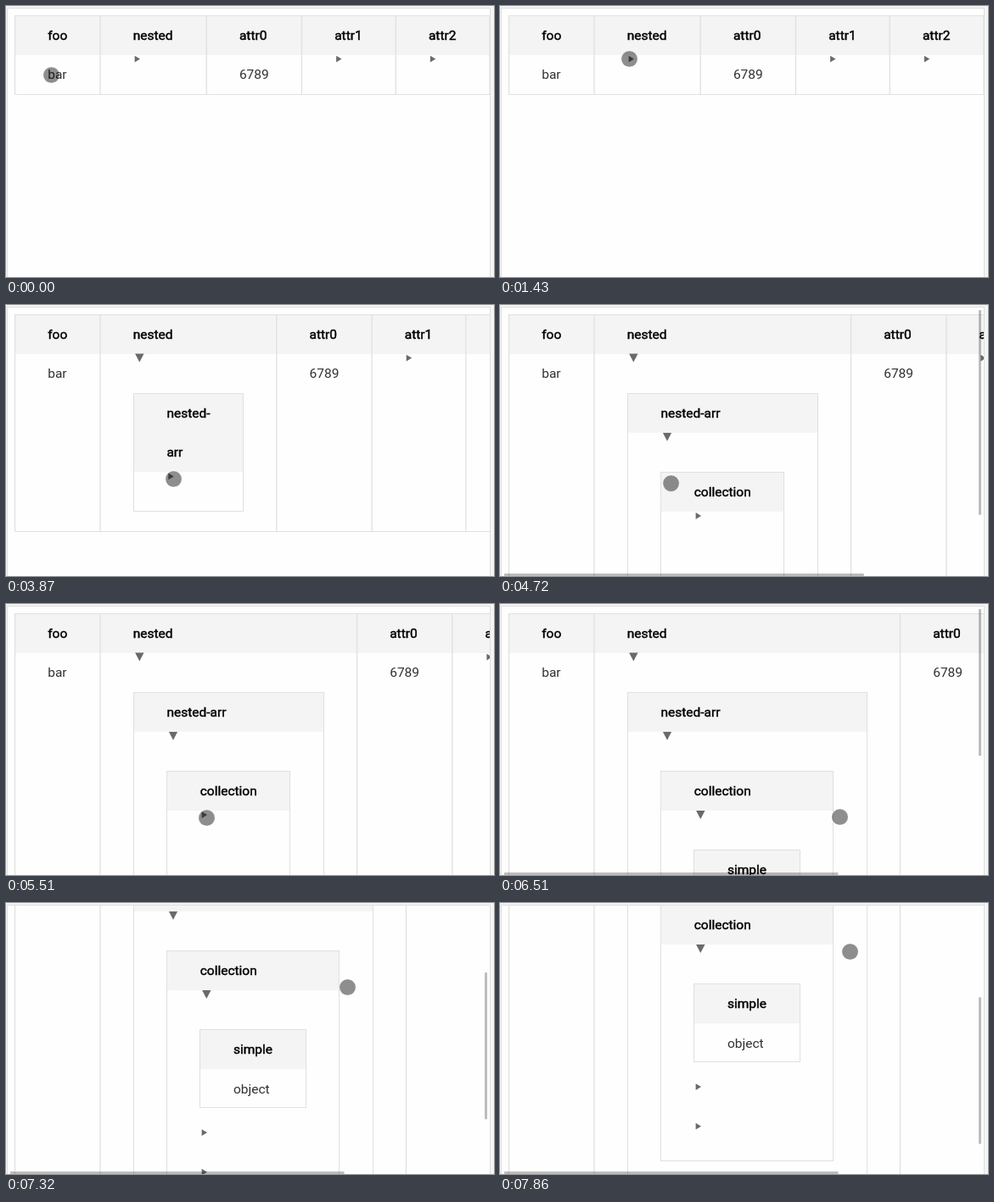
Write an HTML page that moves like this. It is 575 px wide and 320 px high and loops after 8 s.

```html
<!DOCTYPE html>
<html lang="en">
<head>
<meta charset="utf-8">
<title>Nested table</title>
<style>
  html, body { margin: 0; width: 100%; height: 100%; overflow: hidden; background: #f5f5f5; }
  svg { display: block; width: 575px; height: 320px; }
  text { font: 400 15.5px Roboto, sans-serif; fill: #303030; }
  .head { fill: #000; stroke: #000; stroke-width: .45px; }
  .fill { fill: #f4f4f4; }
  .line { fill: none; stroke: #e0e0e0; }
  .rule { stroke-width: 1.3px; }
  .arrow { fill: #6a6a6a; }
  .bar { fill: #000; fill-opacity: .26; }
  .panel { fill: #fefefe; stroke: #dedede; }
</style>
</head>
<body>
<svg viewBox="0 0 575 320">
  <defs><clipPath id="view"><rect x="2" y="3" width="568" height="317"/></clipPath></defs>
  <rect class="panel" x="1.5" y="2.5" width="569" height="330"/>
  <g clip-path="url(#view)"><g id="content"></g></g>
  <g id="bars">
    <rect id="hbar" class="bar" x="5" y="317" height="3"/>
    <rect id="vbar" class="bar" x="564" width="3"/>
  </g>
  <circle id="cursor" r="9.6" fill="#000" fill-opacity=".44" stroke="#fff" stroke-opacity=".5" stroke-width=".6"/>
</svg>
<script>
const LOOP = 8000, LEFT = 10, TOP = 11, ROW = 46.6, PAD = 39.3, GAP = 23.3;
const byId = id => document.getElementById(id);
const content = byId('content');
const crisp = v => Math.floor(v) + .5;

function add(parent, tag, attrs, text = '') {
  const node = document.createElementNS('http://www.w3.org/2000/svg', tag);
  for (const name in attrs) node.setAttribute(name, attrs[name]);
  node.textContent = text;
  return parent.appendChild(node);
}

const label = (g, x, top, text, cls = '') =>
  add(g, 'text', { x: x - .2, y: Math.floor(top + 29), class: cls }, text);

function arrow(g, x, top, open) {
  const y = top + 5;
  const d = open ? `M${x + 2.2} ${y - 5}h10.4l-5.2 10z` : `M${x + 1.7} ${y - 3.9}l6.4 3.9l-6.4 3.9z`;
  add(g, 'path', { d, class: 'arrow' });
}

// Tables nested inside one another; width applies while nothing inside is expanded.
const chain = [
  { lines: ['nested-arr'], closedLines: ['nested-', 'arr'], width: 129.2 },
  { lines: ['collection'], width: 145.3, moreRows: 2 },
  { lines: ['simple'], width: 124.7, value: 'object' }
];

// Draws one table with its expanded descendants and returns its far corner.
function drawTable(g, index, left, top, depth) {
  const { lines, closedLines, width, value, moreRows = 0 } = chain[index];
  const open = depth > index + 1 && !value;
  const header = open ? lines : closedLines || lines;
  const inner = left + PAD;
  let right = left + width;
  let y = top + ROW * header.length;

  if (value) label(g, inner, y, value);
  else arrow(g, inner, y, open);
  y += ROW;
  if (open) {
    const child = drawTable(g, index + 1, inner, y, depth);
    right = child.right + PAD;
    y = child.bottom + GAP;
    for (let i = 0; i < moreRows; i++, y += ROW) arrow(g, inner, y, false);
  } else if (moreRows) y += ROW;

  add(g, 'rect', { x: left, y: top, width: right - left, height: ROW * header.length, class: 'fill' });
  header.forEach((text, i) => label(g, inner, top + ROW * i, text, 'head'));
  add(g, 'rect', {
    x: crisp(left), y: crisp(top), class: 'line',
    width: Math.round(right - left), height: Math.round(y - top) - 1
  });
  return { right, bottom: y };
}

function buildView(depth) {
  const g = add(content, 'g', { display: 'none' });
  const body = TOP + ROW, nestedLeft = 111;
  let nestedRight = 236.2, bottom = body + ROW;

  const header = add(g, 'rect', { x: LEFT, y: TOP, height: ROW + .4, class: 'fill' });
  if (depth) {
    const child = drawTable(g, 0, nestedLeft + PAD, bottom, depth);
    nestedRight = child.right + PAD;
    bottom = child.bottom + GAP;
  }

  const edges = [LEFT + .5, nestedLeft, nestedRight];
  for (let i = 0; i < 3; i++) edges.push(nestedRight + 112.3 + 110.75 * i);
  const right = edges[5];
  header.setAttribute('width', right - LEFT);
  add(g, 'path', { d: edges.map(x => `M${x} ${TOP}V${bottom}`).join(''), class: 'line rule' });
  add(g, 'path', { d: `M${LEFT} ${crisp(TOP)}H${right}M${LEFT} ${crisp(bottom)}H${right}`, class: 'line' });

  ['foo', 'nested', 'attr0', 'attr1', 'attr2'].forEach((name, i) => {
    const x = edges[i] + PAD - .4;
    label(g, x, TOP, name, 'head');
    if (i === 0) label(g, x, body, 'bar');
    else if (i === 2) label(g, x, body, '6789');
    else arrow(g, x, body, i === 1 && depth > 0);
  });
  return { g, width: right + 6, height: bottom + 28 };
}

const views = [0, 1, 2, 3].map(buildView);
const expandTimes = [2670, 4450, 6050];
const barShows = [[3230, 3740], [4600, 4990], [6510, 6650], [7050, LOOP]];

const easeIn = p => p * p;
const easeOut = p => p * (2 - p);
const smooth = p => p * p * (3 - 2 * p);
const overshoot = p => 1 + 2.7 * (p - 1) ** 3 + 1.7 * (p - 1) ** 2;

// Moves jump in equal steps from start to end; sag bends the path downwards.
const moves = [
  { start: 410, end: 1430, steps: 8, x: 152.5, y: 62.5, sag: 15, ease: overshoot },
  { start: 3070, end: 3620, steps: 4, x: 197.5, y: 205.5, ease: easeOut },
  { start: 4600, end: 5110, steps: 4, x: 236.5, y: 254.5, ease: smooth },
  { start: 5360, end: 5510, steps: 1, x: 236.5, y: 252.5, ease: smooth },
  { start: 6210, end: 6510, steps: 2, x: 400.5, y: 251.5, ease: smooth },
  { start: 7050, end: 7320, steps: 2, x: 402.5, y: 99.5, scroll: 141, ease: easeIn },
  { start: 7440, end: 7860, steps: 3, x: 412.5, y: 57.5, scroll: 195, ease: easeOut }
];

function poseAt(t) {
  let x = 53.5, y = 81.5, scroll = 0;
  for (const m of moves) {
    if (t < m.start) break;
    const step = Math.floor((t - m.start) / (m.end - m.start) * m.steps);
    const p = Math.min(1, (step + 1) / (m.steps + 1)), k = m.ease(p);
    x += (m.x - x) * k;
    y += (m.y - y) * (m.sag ? p : k) + (m.sag || 0) * Math.sin(Math.PI * p);
    scroll += ((m.scroll || 0) - scroll) * k;
  }
  return { x, y, scroll };
}

function barOpacity(t) {
  const show = barShows.find(([from, fade]) => t >= from && t < fade + 125);
  return show ? (t < show[1] ? 1 : .5) : 0;
}

function thumb(id, attr, track, visible, size) {
  byId(id).setAttribute(attr, size > visible ? track * visible / size : 0);
}

function draw(now) {
  const t = now % LOOP;
  const { x, y, scroll } = poseAt(t);
  const view = views[expandTimes.filter(time => time <= t).length];
  views.forEach(v => v.g.setAttribute('display', v === view ? 'inline' : 'none'));
  content.setAttribute('transform', `translate(0 ${-Math.round(scroll)})`);
  byId('bars').setAttribute('opacity', barOpacity(t));
  thumb('hbar', 'width', 562, 568, view.width);
  thumb('vbar', 'height', 314, 317, view.height);
  byId('vbar').setAttribute('y', 6 + scroll * .54);
  byId('cursor').setAttribute('transform', `translate(${x} ${y})`);
}

const start = performance.now();
function tick() {
  draw(performance.now() - start);
  requestAnimationFrame(tick);
}
tick();
</script>
</body>
</html>
```
